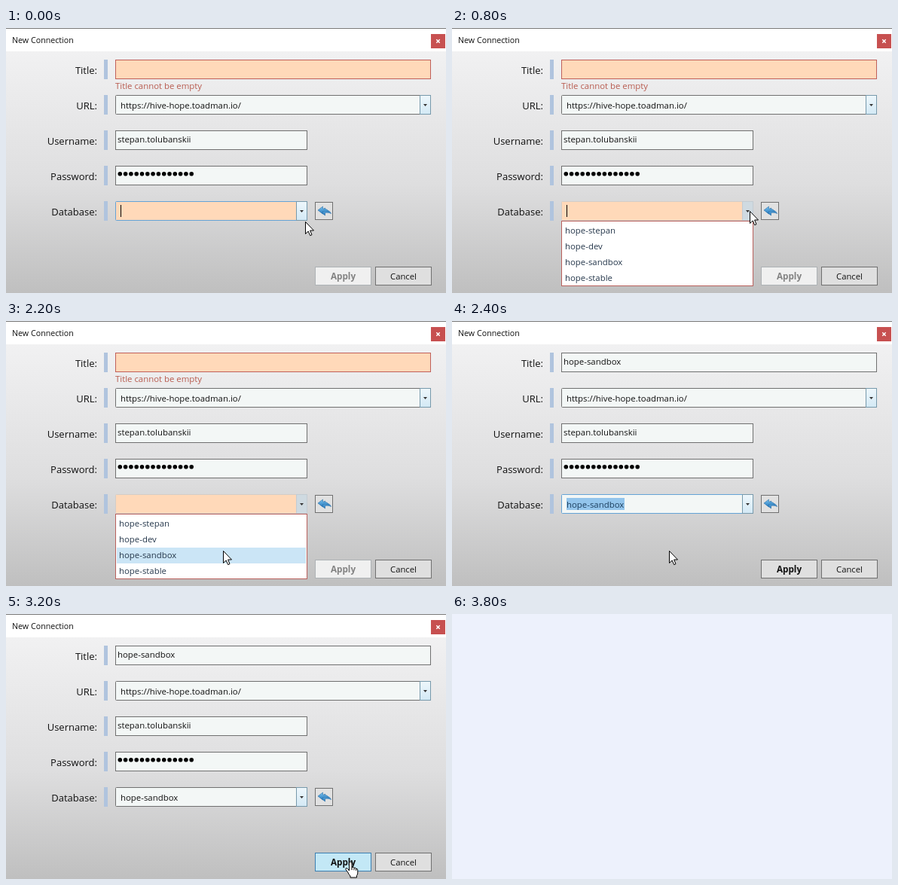
An HTML page for the animation above (4.6 s loop, 584x352 px).

```html
<!DOCTYPE html>
<html lang="en">
<head>
<meta charset="utf-8">
<title>New Connection</title>
<style>
  html, body { margin: 0; width: 100%; height: 100%; overflow: hidden; background: #edf1fc; }
  svg { display: block; width: 100%; height: 100%; }
  text { font-family: "Open Sans", "Noto Sans", sans-serif; font-size: 11.4px; fill: #111; white-space: pre; }
</style>
</head>
<body>
<svg id="stage" viewBox="0 0 584 352">
  <defs>
    <linearGradient id="body" x1="0" y1="0" x2="0" y2="1">
      <stop offset="0" stop-color="#f1f1f2"/>
      <stop offset=".55" stop-color="#dededf"/>
      <stop offset="1" stop-color="#bfbfbf"/>
    </linearGradient>
    <linearGradient id="drop" x1="0" y1="0" x2="0" y2="1">
      <stop offset="0" stop-color="#eef7fc"/>
      <stop offset="1" stop-color="#d3e9f5"/>
    </linearGradient>
    <linearGradient id="icon" x1="0" y1="0" x2="0" y2="1">
      <stop offset="0" stop-color="#7cc4f0"/>
      <stop offset="1" stop-color="#2478bd"/>
    </linearGradient>
    <filter id="shadow" x="-10%" y="-15%" width="120%" height="130%">
      <feGaussianBlur stdDeviation="5"/>
    </filter>
    <clipPath id="below"><rect x="140" y="256" width="265" height="90"/></clipPath>
  </defs>
</svg>
<script>
const LOOP = 4600, STEP = 200;
const INK = '#707070', FIELD = '#f3f7f6', ERROR = '#ffd9b9', RED = '#c0605a';
const stage = document.getElementById('stage');

function add(parent, tag, attrs, content) {
  const el = document.createElementNS('http://www.w3.org/2000/svg', tag);
  set(el, attrs);
  if (content) el.textContent = content;
  return parent.appendChild(el);
}
function set(el, attrs) {
  for (const key in attrs) el.setAttribute(key, attrs[key]);
}
const show = (el, on) => el.setAttribute('visibility', on ? 'visible' : 'hidden');
const group = (parent, attrs) => add(parent, 'g', attrs);
const fill = (g, x, y, width, height, color) => add(g, 'rect', { x, y, width, height, fill: color });
const box = (g, x, y, w, h, color, stroke, rx = 0) =>
  add(g, 'rect', { x: x + .5, y: y + .5, width: w - 1, height: h - 1, fill: color, stroke, rx });
const label = (g, x, y, content, style = '', anchor = 'start') =>
  add(g, 'text', { x, y, style, 'text-anchor': anchor }, content);

function titleBar(g, x, y, w, title, size) {
  fill(g, x, y, w, 31, '#fff');
  fill(g, x, y, w, 1, '#777');
  label(g, x + 8, y + 20, title, `font-size:${size}px`);
  const right = x + w - 20;
  fill(g, right, y + 8, 19, 19, '#c75050');
  add(g, 'path', {
    d: `M${right + 7.3} ${y + 15.3}l4.4 4.4m0-4.4l-4.4 4.4`, stroke: '#fff', 'stroke-width': 1.5
  });
}

function button(g, x, y, h, content, weight = 400, size = 11.3) {
  const rect = box(g, x, y, 75, h, '#dfdfdf', INK);
  const text = label(g, x + 37.5, y + h / 2 + 4.5, content, `font-weight:${weight};font-size:${size}px`, 'middle');
  return { rect, text };
}

function dropButton(g, x, y, h) {
  const rect = box(g, x, y, 15, h, 'url(#drop)', '#7799ab');
  add(g, 'path', { d: `M${x + 5} ${y + 12}h5l-2.5 3z`, fill: '#333' });
  return rect;
}

// connection form
const form = group(stage);
fill(form, 0, 31, 584, 321, 'url(#body)');
titleBar(form, 0, 0, 584, 'New Connection', 10.7);
['Title:', 'URL:', 'Username:', 'Password:', 'Database:'].forEach((name, i) => {
  const y = 42 + i * 47;
  label(form, 121, y + 19, name, 'font-size:13px', 'end');
  fill(form, 130, y, 5, 26, '#b0c4de');
});

const titleBox = box(form, 145, 42, 419, 26, ERROR, RED);
const titleError = label(form, 145, 81, 'Title cannot be empty', 'fill:#b85c50');
const titleText = label(form, 148, 58, 'hope-sandbox');

box(form, 145, 89, 419, 26, FIELD, INK, 1);
dropButton(form, 549, 89, 26);
label(form, 152, 107, 'https://hive-hope.toadman.io/');

box(form, 145, 136, 255, 26, FIELD, INK);
label(form, 148, 152, 'stepan.tolubanskii');

box(form, 145, 183, 255, 26, FIELD, INK);
for (let i = 0; i < 14; i++)
  add(form, 'circle', { cx: 151.3 + i * 7.3, cy: 193.7, r: 2.8, fill: '#000' });

const baseBox = box(form, 145, 230, 255, 26, ERROR, INK, 1);
const baseDrop = dropButton(form, 385, 230, 26);
const selection = fill(form, 152, 235, 77, 16, '#93c5ec');
const baseText = label(form, 152, 248, 'hope-sandbox');
const caret = fill(form, 152, 235, 1, 16, '#000');

box(form, 410, 231, 24, 24, '#e1e1e1', INK);
const arrow = 'M0 0l6.5-5v3c4 0 6.500 1 8 4.500-2.500-1.500-5-1.500-8-1v3.500z';
for (const [x, y] of [[417, 244], [414, 242]])
  add(form, 'path', {
    d: arrow, transform: `translate(${x} ${y})`, fill: 'url(#icon)', stroke: '#2b70a8', 'stroke-width': .6
  });

const apply = button(form, 410, 317, 25, 'Apply', 700, 11.7);
button(form, 490, 317, 25, 'Cancel');

const popup = group(group(form, { 'clip-path': 'url(#below)' }));
box(popup, 145, 256, 255, 87, '#fff', '#b9605c');
const hover = fill(popup, 147, 301, 251, 21, '#cbe5f6');
['hope-stepan', 'hope-dev', 'hope-sandbox', 'hope-stable'].forEach((name, i) =>
  label(popup, 150, 273 + i * 21, name, 'fill:#26384c'));

// progress dialog
const dialog = group(stage);
add(dialog, 'rect', { x: 100, y: 82, width: 384, height: 190, fill: '#000', opacity: .5, filter: 'url(#shadow)' });
fill(dialog, 100, 111, 384, 161, 'url(#body)');
titleBar(dialog, 100, 80, 384, 'Loading hope-sandbox', 11.4);
label(dialog, 120, 148, 'Synchronizing with remote database', 'font-size:15.1px;fill:#3a5250');
label(dialog, 120, 175, 'Please, wait...', 'font-size:12px;fill:#3a5250');
box(dialog, 120, 201, 344, 14, '#e2e2e3', '#b8bac6');
button(dialog, 389, 229, 23, 'Abort...', 400, 11.2);

// pointers
const pointer = add(stage, 'path', {
  d: 'M.5 .5V16.500L4.200 13 6.700 18.700 9 17.700 6.600 12H11.500Z',
  fill: '#fff', stroke: '#000', 'stroke-linejoin': 'round'
});
const hand = add(stage, 'path', {
  d: 'M455.500 341V331q0-2 1.700-2t1.800 2v5.500q2.500-1 3 .8 2.300-.8 2.600 1 2.200-.3 2.200 1.700v4q0 2-1.300 3.500v2.500h-8.500v-2q-2-2-3.300-5l-2.700-3.500q-.6-1.800 1-2 1.500 0 3.500 3.500zM459 336.500v3.500M462 337.300v3M464.600 338.300v2.500',
  fill: '#fff', stroke: '#000', 'stroke-linejoin': 'round'
});

// [time, x, y]
const route = [
  [0, 397, 257], [200, 396, 251], [400, 395, 243], [1200, 393, 242], [1400, 391, 241],
  [1600, 306, 308], [1800, 288, 305], [2600, 306, 317], [2800, 440, 331], [3400, 455, 329]
];

function render(time) {
  const t = Math.floor(time / STEP) * STEP;
  const within = (from, to) => t >= from && t < to;
  const chosen = t >= 2400, open = within(600, 2400);
  const focused = t < 3200;

  show(form, t < 3400);
  show(dialog, within(3400, 3600));
  if (t < 3400) {
    set(titleBox, { fill: chosen ? FIELD : ERROR, stroke: chosen ? INK : RED });
    titleError.style.display = chosen ? 'none' : '';
    titleText.style.display = chosen ? '' : 'none';

    set(baseBox, {
      fill: chosen ? FIELD : ERROR,
      stroke: open ? '#d3cdc8' : focused ? '#64a3d6' : INK
    });
    set(baseDrop, {
      fill: open ? (t < 800 ? '#e6eef4' : '#cfdae1') : 'url(#drop)',
      stroke: open ? '#c3ccd3' : '#7799ab'
    });
    baseText.style.display = chosen ? '' : 'none';
    baseText.style.fill = focused ? '#1d3f5e' : '#111';
    selection.style.display = chosen && focused ? '' : 'none';
    const lit = t < 200 || within(600, 1200) || within(1800, 2200);
    caret.style.display = lit ? '' : 'none';

    popup.style.display = open ? '' : 'none';
    set(popup, { transform: `translate(0 ${t < 800 ? -77 : 0})` });
    hover.style.display = t >= 1600 ? '' : 'none';

    const over = t >= 2800;
    set(apply.rect, {
      fill: !chosen ? '#f0f0f0' : over ? (t < 3200 ? '#bee6fd' : '#c3e8f6') : '#dfdfdf',
      stroke: !chosen ? '#adb2b5' : over ? '#3c7fb1' : INK
    });
    apply.text.style.fill = chosen ? '#111' : '#838383';
  }

  const [, x, y] = route.filter(p => p[0] <= t).pop();
  set(pointer, { transform: `translate(${x} ${y})` });
  show(hand, within(3000, 3400));
  show(pointer, t < 3000 || within(3400, 3800));
}

const start = performance.now();
function tick() {
  render((performance.now() - start) % LOOP);
  requestAnimationFrame(tick);
}
render(0);
requestAnimationFrame(tick);
</script>
</body>
</html>
```
